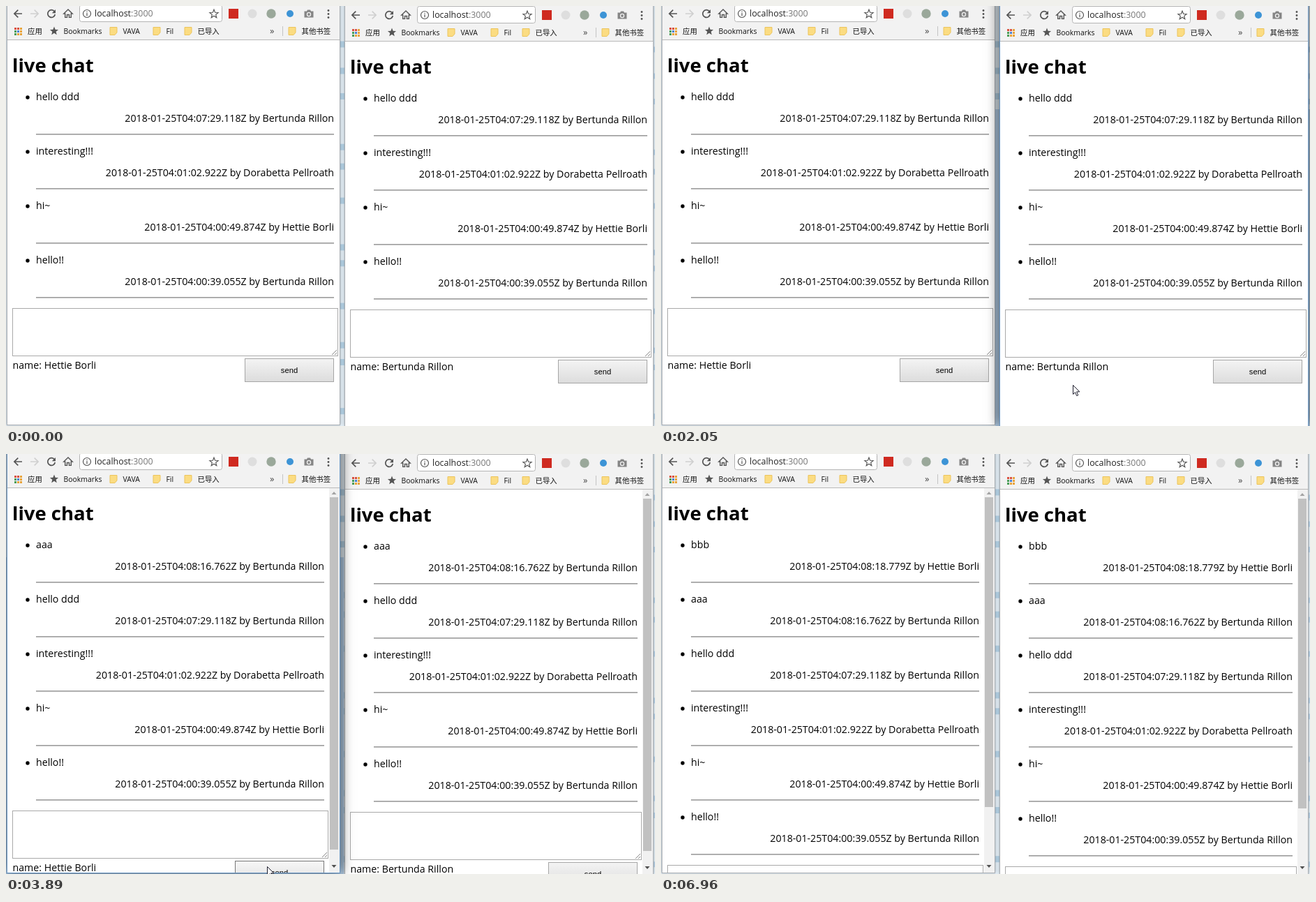
Animation, 930 px wide and 602 px high, one loop 7.06 s. Source, as an HTML page with a canvas:

```html
<!DOCTYPE html>
<html lang="en">
<head>
<meta charset="utf-8">
<title>live chat</title>
<style>
html, body { margin: 0; width: 100%; height: 100%; overflow: hidden; background: #fff; }
canvas { display: block; }
</style>
</head>
<body>
<canvas id="stage" width="930" height="602"></canvas>
<script>
const ctx = document.getElementById('stage').getContext('2d');
const LOOP = 7060, TICK = 70, ROW = 78, BODY = 14.2;
const SANS = '"Open Sans", "Noto Sans CJK SC", "Noto Sans CJK", sans-serif';
const ARIAL = '"Liberation Sans", Arial, sans-serif';
const MONO = '"Liberation Mono", monospace';

const ANNA = 'Bertunda Rillon', MAY = 'Dorabetta Pellroath', KIT = 'Hettie Borli';
const messages = [
  ['bbb', '04:08:18.779', KIT],
  ['aaa', '04:08:16.762', ANNA],
  ['hello ddd', '04:07:29.118', ANNA],
  ['interesting!!!', '04:01:02.922', MAY],
  ['hi~', '04:00:49.874', KIT],
  ['hello!!', '04:00:39.055', ANNA],
];

// Pointer route: time, x, y
const route = [
  [70, 926, 512], [490, 660, 470], [770, 640, 465], [1260, 833, 520], [1330, 833, 520],
  [1400, 836, 522], [1470, 836, 522], [1610, 842, 526], [1820, 842, 526], [2030, 590, 543],
  [2240, 440, 545], [2450, 300, 528], [2730, 277, 522], [2940, 277, 522], [3430, 374, 591],
  [4590, 374, 591], [4830, 520, 534], [4970, 604, 543], [5320, 770, 583], [5390, 771, 584],
  [5600, 771, 584], [6020, 905, 509], [6130, 927, 511], [6260, 927, 511],
];

function pointerAt(time) {
  if (time < 70 || time >= 6260) return null;
  const t = Math.floor(time / TICK) * TICK;
  const i = Math.max(1, route.findIndex(key => key[0] >= t));
  const [t0, x0, y0] = route[i - 1], [t1, x1, y1] = route[i];
  const k = (t - t0) / (t1 - t0);
  return { x: Math.round(x0 + (x1 - x0) * k), y: Math.round(y0 + (y1 - y0) * k) };
}

function rect(x, y, w, h, fill) {
  ctx.fillStyle = fill;
  ctx.fillRect(x, y, w, h);
}

function frame(x, y, w, h, color, width = 1) {
  ctx.strokeStyle = color;
  ctx.lineWidth = width;
  ctx.strokeRect(x + .5, y + .5, w - 1, h - 1);
}

function disc(x, y, r, fill) {
  ctx.fillStyle = fill;
  ctx.beginPath();
  ctx.arc(x, y, r, 0, 7);
  ctx.fill();
}

function text(str, x, y, size, { color = '#000', align = 'left', family = SANS, weight = '' } = {}) {
  ctx.font = `${weight} ${size}px ${family}`;
  ctx.fillStyle = color;
  ctx.textAlign = align;
  ctx.fillText(str, x, y);
  return ctx.measureText(str).width;
}

function icon(x, y, path, { stroke, fill, width = 1.5 }) {
  const shape = new Path2D(path);
  ctx.save();
  ctx.translate(x, y);
  if (fill) { ctx.fillStyle = fill; ctx.fill(shape); }
  if (stroke) { ctx.strokeStyle = stroke; ctx.lineWidth = width; ctx.stroke(shape); }
  ctx.restore();
}

const star = 'M' + Array.from({ length: 10 }, (_, i) => {
  const r = i % 2 ? 2.8 : 6.4, a = i * Math.PI / 5;
  return `${(r * Math.sin(a)).toFixed(2)} ${(-r * Math.cos(a)).toFixed(2)}`;
}).join('L') + 'Z';

function folder(x) {
  icon(x, 36, 'M-5-5.5H5V2L2 5.5H-5Z', { fill: '#fbdc82', stroke: '#ecc45c', width: 1 });
}

function toolbar(w) {
  const dark = '#555', label = (str, x) => text(str, x, 40, 10.4, { color: '#111' });
  rect(0, -2, w + 1, 50, '#f2f2f2');
  rect(0, 48, w + 1, 1, '#b9b9b9');

  icon(17, 11, 'M6 0H-5M.3-5.4L-5.1 0 .3 5.4', { stroke: dark, width: 1.7 });
  icon(41, 11, 'M-6 0H5M-.3-5.4L5.1 0-.3 5.4', { stroke: '#d0d0d0', width: 1.7 });
  icon(65, 11, 'M4-3.6A5.3 5.3 0 1 0 5.3 1', { stroke: dark, width: 1.7 });
  icon(65, 11, 'M6-6V-.8H.8Z', { fill: dark });
  icon(89, 11, 'M-6.2 0L0-6 6.2 0H4.3V5.4H1.5V1.5H-1.5V5.4H-4.3V0Z', { stroke: dark, width: 1.4 });

  ctx.beginPath();
  ctx.roundRect(105.5, -1.5, w - 274, 24, 3);
  ctx.fillStyle = '#fff';
  ctx.fill();
  ctx.strokeStyle = '#b4b4b4';
  ctx.lineWidth = 1;
  ctx.stroke();
  icon(116, 11, 'M5.5 0A5.5 5.5 0 1 1-5.5 0A5.5 5.5 0 1 1 5.5 0M0-1V3.2M0-3.3V-2', { stroke: dark, width: 1.2 });
  const host = text('localhost', 127, 15, 12.4, { color: '#222' });
  text(':3000', 127 + host, 15, 12.4, { color: '#777' });
  icon(w - 180, 11.5, star, { stroke: dark, width: 1.2 });

  rect(w - 159, 4, 14, 14, '#cf2a20');
  disc(w - 125, 11, 6.5, '#dedede');
  disc(w - 98, 11, 6.7, '#9aa89a');
  disc(w - 71, 11, 5, '#3d94d6');
  icon(w - 44, 11, 'M-6.5-3.5H-3L-2-5.5H2L3-3.5H6.5V5.5H-6.5Z', { fill: '#858585' });
  disc(w - 44, 12, 3.2, '#f2f2f2');
  disc(w - 44, 12, 1.9, '#858585');
  for (const y of [6.5, 11.5, 16.5]) disc(w - 16, y, 1.4, dark);

  ['#d9503f', '#d9503f', '#e8a33a', '#4a9e57', '#4a82d4', '#e8a33a', '#4a9e57', '#e8a33a', '#e8a33a']
    .forEach((color, i) => rect(12 + i % 3 * 4, 31 + Math.floor(i / 3) * 4, 3, 3, color));
  label('应用', 31);
  icon(69, 36, star, { fill: dark });
  label('Bookmarks', 82.5);
  folder(154);
  label('VAVA', 167.5);
  folder(216);
  label('Fil', 229.5);
  folder(261);
  label('已导入', 274.5);
  text('»', w - 100, 40, 13, { color: '#444' });
  rect(w - 82, 29, 1, 14, '#c4c4c4');
  folder(w - 68);
  label('其他书签', w - 54.5);
}

function scrollbar(w, thumbEnd) {
  rect(w - 15, 49, 15, 551, '#f1f1f1');
  rect(w - 14, 62, 12, thumbEnd - 62, '#c1c1c1');
  icon(w - 8, 56, 'M-3.5 2L0-2 3.5 2Z', { fill: '#a3a3a3' });
  icon(w - 8, 591, 'M-3.5-2L0 2 3.5-2Z', { fill: '#505050' });
}

function boxes(w, count) {
  const scrolls = count > 4, right = w - (scrolls ? 22 : 8), shift = (count - 4) * ROW;
  return {
    right, shift, scrolls,
    area: { x: 9, y: 433 + shift, w: (scrolls ? w - 17 : w - 3) - 8, h: 69 },
    button: { x: right - 128, y: 505 + shift, w: 128, h: 34 },
  };
}

const inside = (p, b) => p && p.x >= b.x && p.x < b.x + b.w && p.y >= b.y && p.y < b.y + b.h;

function page(win, count, pointer) {
  const { right, shift, scrolls, area, button } = boxes(win.w, count);
  text('live chat', 9, 95, 27.5, { weight: 'bold' });
  messages.slice(-count).forEach(([body, time, author], i) => {
    const y = i * ROW;
    disc(31, 131 + y, 2.7, '#000');
    text(body, 43, 135 + y, BODY);
    text(`2018-01-25T${time}Z by ${author}`, right, 166 + y, BODY, { align: 'right' });
    rect(43, 183 + y, right - 43, 1, '#a0a0a0');
    rect(43, 184 + y, right - 43, 1, '#bdbdbd');
  });

  rect(area.x, area.y, area.w, area.h, '#fff');
  frame(area.x, area.y, area.w, area.h, win.typing ? '#6c9de2' : '#a9a9a9', win.typing ? 2 : 1);
  icon(area.x + area.w - 2, area.y + area.h - 2, 'M-7 0L0-7M-3 0L0-3', { stroke: '#888', width: 1 });
  const chars = text(win.draft, 12, area.y + 12, 10, { family: MONO });
  if (win.typing) rect(Math.round(12 + chars), area.y + 3, 1, 12, '#000');

  text('name: ' + win.user, 9.5, 520 + shift, BODY);
  const hover = inside(pointer, button);
  const shade = ctx.createLinearGradient(0, button.y, 0, button.y + button.h);
  shade.addColorStop(0, hover ? '#f8f8f8' : '#f4f4f4');
  shade.addColorStop(1, '#dcdcdc');
  rect(button.x, button.y, button.w, button.h, shade);
  frame(button.x, button.y, button.w, button.h, hover ? '#777' : '#a6a6a6');
  text('send', button.x + 64, button.y + 20.5, 11.2, { align: 'center', family: ARIAL });
  if (scrolls) scrollbar(win.w, count > 5 ? 506 : 567);
}

function drawWindow(win, count, pointer) {
  const local = pointer && { x: pointer.x - win.x, y: pointer.y - win.y };
  ctx.save();
  ctx.translate(win.x, win.y);
  ctx.save();
  ctx.shadowColor = win.active ? 'rgba(0,0,0,.75)' : 'rgba(0,0,0,.3)';
  ctx.shadowBlur = win.active ? 17 : 4;
  rect(1, -20, win.w, 620, '#fff');
  ctx.restore();
  ctx.save();
  ctx.beginPath();
  ctx.rect(1, -20, win.w, 620);
  ctx.clip();
  toolbar(win.w);
  page(win, count, local);
  ctx.restore();
  frame(1, -20, win.w, 621, win.active ? '#6c98c4' : '#a8adb2');
  ctx.restore();
}

function desktop(active) {
  rect(0, 0, 930, 602, '#e3eef6');
  for (let y = 40; y < 602; y += 48) {
    const sway = 14 * Math.sin(y);
    rect(478, y + sway, 8, 9, '#b5d2e6');
    rect(927, y + sway + 8, 3, 8, '#bcd6ea');
  }
  if (active) rect(active.x - 5, 148, active.w + 11, 454, '#b4cfe8');
}

function drawPointer(p, beam) {
  if (beam) {
    icon(p.x + .5, p.y, 'M-2.5-6.5H-.8L0-6 .8-6.5H2.5M0-6V6M-2.5 6.5H-.8L0 6 .8 6.5H2.5', { stroke: '#000', width: 1 });
  } else {
    icon(p.x + .5, p.y + .5, 'M0 0V13L3 10.2 5.2 15.2 7.3 14.3 5.1 9.4H9.3Z',
      { fill: '#fff', stroke: '#1c1c2c', width: 1 });
  }
}

const between = (t, from, to) => t >= from && t < to;

function draft(t, letter, times, cleared) {
  return t < cleared ? letter.repeat(times.filter(at => t >= at).length) : '';
}

function render(t) {
  const pointer = pointerAt(t);
  const count = t < 2110 ? 4 : t < 4130 ? 5 : 6;
  const left = {
    x: 0, y: 0, w: 478, user: KIT,
    active: between(t, 2580, 6960), typing: between(t, 2580, 3740),
    draft: draft(t, 'b', [3050, 3190, 3330], 3890),
  };
  const right = {
    x: 484, y: 2, w: 443, user: ANNA,
    active: between(t, 630, 2580), typing: between(t, 630, 1790),
    draft: draft(t, 'a', [1090, 1230, 1390], 1870),
  };
  const stack = left.active ? [right, left] : [left, right];
  desktop(stack.find(win => win.active));
  stack.forEach(win => drawWindow(win, count, pointer));
  if (pointer) {
    const beam = stack.some(win =>
      inside({ x: pointer.x - win.x, y: pointer.y - win.y }, boxes(win.w, count).area));
    drawPointer(pointer, beam);
  }
}

function loop() {
  render(performance.now() % LOOP);
  requestAnimationFrame(loop);
}
loop();
</script>
</body>
</html>
```
